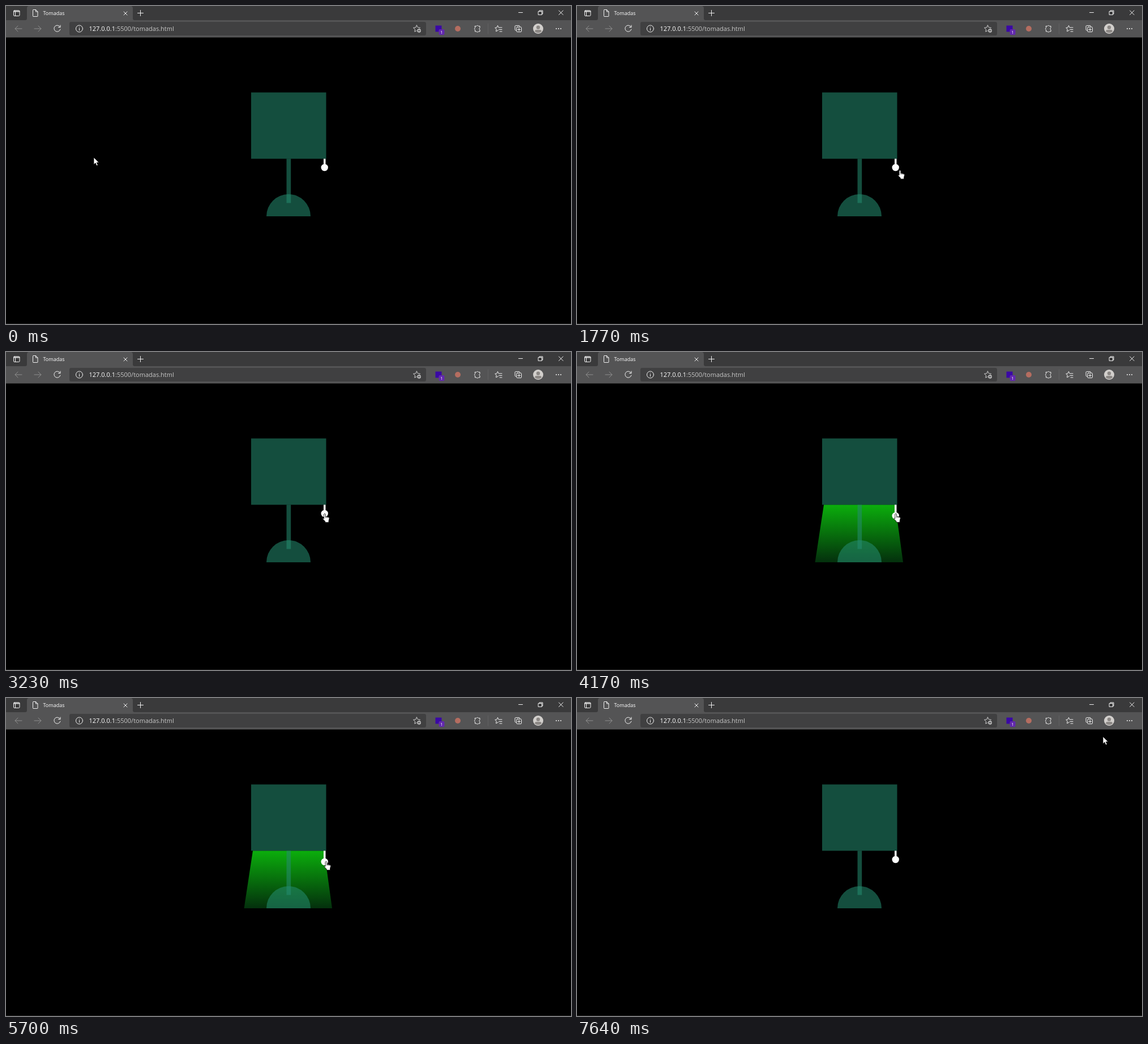
These frames come from a looping animation (998 by 561 pixels, 7680 ms). An HTML page:

```html
<!DOCTYPE html>
<html lang="pt">
<head>
<meta charset="utf-8">
<title>Tomadas</title>
<style>
html, body { margin: 0; width: 100%; height: 100%; overflow: hidden; background: #000; }
svg { display: block; width: 998px; height: 561px; }
text { font-family: "Open Sans", "Noto Sans", sans-serif; fill: #fff; }
.icons { fill: none; stroke: #f0f0f0; stroke-width: 1; stroke-linecap: round; stroke-linejoin: round; }
.lamp { fill: rgba(36, 139, 111, .56); }
.cursor { fill: #fff; stroke: #000; stroke-width: .8; stroke-linejoin: round; }
</style>
</head>
<body>
<svg viewBox="0 0 998 561">
  <defs>
    <linearGradient id="glow" x2="0" y2="1">
      <stop stop-color="#0bae0c"/>
      <stop offset="1" stop-color="#04300d"/>
    </linearGradient>
  </defs>

  <!-- Browser window -->
  <rect width="998" height="561"/>
  <rect width="998" height="25" fill="#3a3a3b"/>
  <rect y="25" width="998" height="30.5" fill="#545455"/>
  <path d="M34 25Q37 25 37 22V4Q37 0 41 0H220Q224 0 224 4V22Q224 25 227 25Z" fill="#545455"/>
  <rect x="112" y="28" width="630" height="24" rx="3" fill="#404041"/>
  <rect y="560" width="998" height="1" fill="#202020"/>

  <text x="65.5" y="15.7" font-size="9">Tomadas</text>
  <text x="146.5" y="43.8" font-size="11">127.0.0.1<tspan fill="#c6c6c6">:5500/tomadas.html</tspan></text>

  <g class="icons">
    <rect x="13.5" y="8" width="10.5" height="9.5" rx="1.5"/>
    <path d="M13.5 9H24M13.5 10H24M16.5 10V17"/>
    <path d="M47.5 7Q47.5 6.5 48 6.5H52.5L56 10V18Q56 18.5 55.5 18.5H48Q47.5 18.5 47.5 18ZM52.5 6.5V10H56"/>
    <path d="M208 10L214 16M214 10L208 16M232.5 12.5H242.5M237.5 7.5V17.5"/>
    <path d="M905.5 11.5H912.5M940.5 9.5H946.5V15.5H940.5ZM942 9.5V8H948V14H946.5M976.5 8L984 15.5M984 8L976.5 15.5"/>
    <path d="M28 40H16M21 35L16 40L21 45M50 40H62M57 35L62 40L57 45" stroke="#8e8e8e"/>
    <path d="M95.5 37A5.6 5.6 0 1 0 96 41M96 34V37.5H92.5"/>
    <circle cx="129.5" cy="40" r="6"/>
    <path d="M129.5 39.3V43M129.5 37V37.1"/>
    <path id="star" d="M725.5 34L727.3 37.7L731.5 38.4L728.5 41.2L729.2 45.3L725.5 43.4L721.8 45.3L722.5 41.2L719.5 38.4L723.7 37.7Z" stroke="#d0d0d0"/>
    <circle cx="729.5" cy="43.5" r="3.8" fill="#d0d0d0" stroke="#404041"/>
    <path d="M727.7 43.5H731.3M729.5 41.7V45.3" stroke="#404041"/>
    <path d="M828.5 35.5H831A2 2 0 0 1 834.5 35.5H837V38.5A2 2 0 0 0 837 42V45H834.5A2 2 0 0 1 831 45H828.5V42A2 2 0 0 1 828.5 38.5Z"/>
    <path d="M851.5 31V49" stroke="#626262"/>
    <path d="M868.5 34.5L870.2 38H876M871 41.5H876M872 45H876M868.5 34.5L866.9 37.9L863.8 38.4L866.2 40.8L865.6 44.8L869.5 42.7"/>
    <path d="M901.5 43H900.5Q899 43 899 41.5V36Q899 34.5 900.5 34.5H906Q907.5 34.5 907.5 36"/>
    <rect x="901.8" y="37" width="8.7" height="8.7" rx="1.5"/>
    <path d="M906.2 39V43.7M903.9 41.4H908.5"/>
  </g>
  <g fill="#f0f0f0">
    <circle cx="972" cy="40" r="1"/><circle cx="976" cy="40" r="1"/><circle cx="980" cy="40" r="1"/>
  </g>
  <rect x="758.5" y="34.5" width="11" height="11" fill="#3a08a5"/>
  <rect x="764.5" y="41" width="10" height="10" rx="2" fill="#6229ad"/>
  <text x="769.5" y="49" font-size="7.5" text-anchor="middle">1</text>
  <circle cx="798" cy="40" r="5" fill="#b56d60"/>
  <circle cx="940" cy="40" r="9" fill="#d2cfcc"/>
  <path d="M934 45Q934 42 937 42H943Q946 42 946 45Q940 50 934 45Z" fill="#8c8885"/>
  <circle cx="940" cy="37.7" r="3.2" fill="#8c8885"/>

  <!-- Lamp -->
  <path id="light" d="M436 269.5H562L576 371H420.5Z" fill="url(#glow)"/>
  <g class="lamp">
    <rect x="433" y="152.5" width="132.5" height="117"/>
    <rect x="495.5" y="269.5" width="7.7" height="78"/>
    <path d="M460 371A39 39 0 0 1 538 371Z"/>
  </g>
  <rect id="cord" x="561" y="269.5" width="3.5" height="12" fill="#fff"/>
  <circle id="ball" cx="562.7" cy="285" r="6.2" fill="#fff"/>

  <g id="cursor" class="cursor">
    <path id="arrow" d="M0 0V12.8L3 10L5 14.8L7.3 13.8L5.3 9.2H9.2Z"/>
    <g id="hand">
      <path d="M-1.4 1.2Q0-.8 1.4 1.2V5.2L6.6 6.4Q8.2 6.9 8.1 8.6L7 13.2V15.7H.8V14L-3.4 9.5Q-3.7 7.6-1.4 9Z"/>
      <path d="M1.4 5V8M3.6 5.8V8M5.8 6.3V8.3" fill="none" stroke-width=".6"/>
    </g>
  </g>
</svg>
<script>
const LOOP = 7680, ON = 3600, OFF = 6430;
const $ = id => document.getElementById(id);
// Cursor stops: time, x, y
const stops = [
  [0, 155, 267], [400, 155, 267], [1450, 570.5, 289.5], [2400, 570.5, 289.5],
  [3000, 563, 285], [4200, 563.2, 284.7], [5000, 565.5, 288], [6300, 565.5, 288],
  [6520, 565.5, 288], [6940, 749, 244], [7640, 929, 68], [LOOP, 929, 68]
];

function cursorAt(t) {
  const i = stops.findIndex(s => s[0] > t);
  const [t0, x0, y0] = stops[i - 1], [t1, x1, y1] = stops[i];
  const u = (t - t0) / (t1 - t0), k = u * u * (3 - 2 * u);
  return [x0 + (x1 - x0) * k, y0 + (y1 - y0) * k];
}

const show = (id, on) => $(id).setAttribute("visibility", on ? "visible" : "hidden");

function draw(now) {
  const t = now % LOOP, lit = t >= ON && t < OFF;
  const [x, y] = cursorAt(t);
  const over = Math.hypot(x - 562.7, y - 285) < 11;
  show("light", lit);
  $("cord").setAttribute("height", lit ? 16 : 12);
  $("ball").setAttribute("cy", lit ? 289 : 285);
  $("cursor").setAttribute("transform", `translate(${x} ${y})`);
  show("hand", over);
  show("arrow", !over);
  requestAnimationFrame(draw);
}
draw(0);
</script>
</body>
</html>
```
